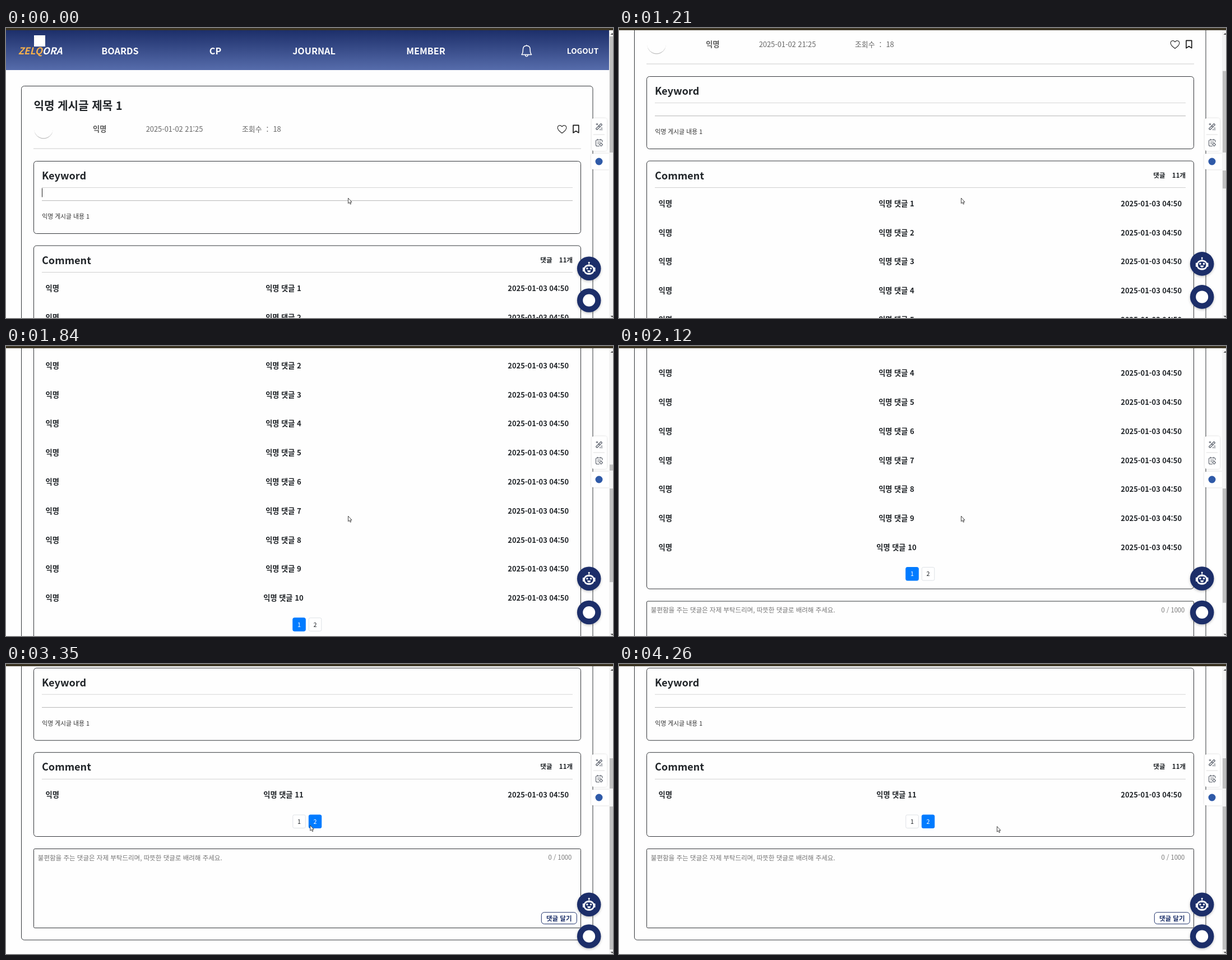
Recreate the animation shown at these times as an HTML page. Size 1083 by 517 pixels, loop 5.12 s.

```html
<!DOCTYPE html>
<html lang="ko">
<head>
<meta charset="utf-8">
<title>Comments</title>
<style>
html, body { margin: 0; width: 100%; height: 100%; overflow: hidden; background: #fefefe; }
svg { display: block; width: 1083px; height: 517px; }
text { font-family: "Noto Sans CJK KR", "Noto Sans CJK", "Noto Sans", sans-serif; white-space: pre; }
</style>
</head>
<body>
<svg id="stage" viewBox="0 0 1083 517" xmlns="http://www.w3.org/2000/svg">
  <defs>
    <linearGradient id="sky" x1="0" y1="0" x2="0" y2="1">
      <stop offset="0" stop-color="#1d2f6a"/><stop offset="1" stop-color="#566cab"/>
    </linearGradient>
    <filter id="soft" x="-30%" y="-30%" width="160%" height="160%">
      <feDropShadow dx="0" dy="1.5" stdDeviation="2" flood-color="#000" flood-opacity=".25"/>
    </filter>
    <filter id="faint" x="-30%" y="-30%" width="160%" height="160%">
      <feDropShadow dx="0" dy="0" stdDeviation="1.8" flood-color="#000" flood-opacity=".18"/>
    </filter>
  </defs>
  <g id="page"></g>
  <g id="bar"></g>
  <g id="tools"></g>
  <g id="robot"></g>
  <g id="chat"></g>
  <rect width="1083" height="4" fill="#3b3423"/>
  <path id="cursor" d="M0 0V9.6L2.2 7.6L3.7 11L5.2 10.3L3.7 7.1H6.5Z" fill="#fff" stroke="#333" stroke-width=".9" stroke-linejoin="round"/>
</svg>
<script>
const LOOP = 5120, SWITCH = 3350, ROW = 51.8, SHRINK = 9 * ROW, MAX_SCROLL = 696.5;
const INK = '#212529', BLUE = '#007bff', NAVY = '#1c2f69';
const $ = id => document.getElementById(id);

const text = (x, y, str, size, { bold = true, fill = INK, anchor = 'start', extra = '' } = {}) =>
  `<text x="${x}" y="${y}" font-size="${size}" font-weight="${bold ? 700 : 400}" fill="${fill}" text-anchor="${anchor}" ${extra}>${str}</text>`;
const rect = (x, y, w, h, r, attrs) =>
  `<rect x="${x}" y="${y}" width="${w}" height="${h}" rx="${r}" ${attrs}/>`;
const box = (y, h, id = '', r = 5) =>
  rect(49.5, y, 976, h, r, `id="${id}" fill="none" stroke="#33363a"`);
const rule = (x1, x2, y, color) => `<path d="M${x1} ${y}H${x2}" stroke="${color}"/>`;
const line = (d, color, width) =>
  `<path d="${d}" fill="none" stroke="${color}" stroke-width="${width}" stroke-linecap="round" stroke-linejoin="round"/>`;

function header() {
  const nav = [['BOARDS', 203.5], ['CP', 373.5], ['JOURNAL', 549.5], ['MEMBER', 749]];
  return rect(0, 4, 1076, 71, 0, 'fill="url(#sky)"') +
    rect(50, 13, 20, 20, 0, 'fill="#fff"') +
    text(61, 46.5, '<tspan fill="#f5b04c">ZELQ</tspan>ORA', 17, { fill: '#fff', anchor: 'middle', extra: 'font-style="italic"' }) +
    nav.map(([s, x]) => text(x, 46.5, s, 16.2, { fill: '#fff', anchor: 'middle' })).join('') +
    line('M920 47.5C922 45.5 922.4 43 922.4 38.5C922.4 34 925 31.6 928.8 31.6S935.2 34 935.2 38.5C935.2 43 935.6 45.5 937.6 47.5ZM926.4 48C926.8 51.5 930.8 51.5 931.2 48M928.8 30.4V31.6', '#fff', 1.5) +
    text(1029, 45.5, 'LOGOUT', 13.5, { fill: '#fff', anchor: 'middle' });
}

function post() {
  const grey = '#666';
  return rect(27.5, 103.5, 1019.5, 1085, 5, 'id="frame" fill="none" stroke="#33363a"') +
    text(49.5, 145.6, '익명 게시글 제목 1', 20.1) +
    '<circle cx="67" cy="180.8" r="16.6" fill="#bbb"/><circle cx="67" cy="179" r="17.2" fill="#fefefe"/>' +
    text(155, 185, '익명', 13.2, { fill: '#5c5c5c' }) +
    text(249.7, 184.8, '2025-01-02 21:25', 12.85, { bold: false, fill: grey }) +
    text(421, 184.8, '조회수 ： 18', 12.85, { bold: false, fill: grey }) +
    line('M992 187.5C986.5 183.6 984.2 181.3 984.2 178C984.2 173 990 172.2 992 176C994 172.2 999.8 173 999.8 178C999.8 181.3 997.5 183.6 992 187.5Z', '#222', 1.1) +
    line('M1012 173.4H1021.8V186.8L1016.9 183.6L1012 186.8Z', '#111', 1.6) +
    rule(49, 1026, 215, '#ccc') +
    box(237.5, 129) + text(64, 270, 'Keyword', 18.1) +
    rule(64, 1011, 284.5, '#d5d5d5') + rule(64, 1011, 307.7, '#b4b4b4') +
    '<path id="caret" d="M64.5 285.5V301.5" stroke="#222"/>' +
    text(64.3, 340, '익명 게시글 내용 1', 10.8, { bold: false, fill: '#333' });
}

function comment(n, row) {
  const y = 468.8 + row * ROW;
  return text(70.6, y, '익명', 13.3) +
    text(495, y, `익명 댓글 ${n}`, 13.2, { anchor: 'middle' }) +
    text(1004, y, '2025-01-03 04:50', 12.9, { anchor: 'end' });
}

function comments() {
  const first = Array.from({ length: 10 }, (_, i) => comment(i + 1, i)).join('');
  return box(388, 616, 'list') + text(64, 420.5, 'Comment', 18.1) +
    text(953.3, 417.6, '댓글', 11.5) + text(1011, 417.6, '11개', 11.5, { anchor: 'end' }) +
    rule(64, 1011, 435.5, '#d0d0d0') +
    `<g id="first">${first}</g><g id="second">${comment(11, 0)}</g>`;
}

function pager() {
  return [1, 2].map(n => rect(483.3 + 28.5 * n, 965.5, 22.5, 23.5, 2.5, `id="tab${n}"`) +
    text(494.5 + 28.5 * n, 981.4, n, 10.8, { bold: false, anchor: 'middle', extra: `id="num${n}"` })).join('');
}

function form() {
  const hint = { bold: false, fill: '#757575' };
  return box(1026, 141, '', 2) +
    text(56.8, 1046.2, '불편함을 주는 댓글은 자제 부탁드리며, 따뜻한 댓글로 배려해 주세요.', 11.53, hint) +
    text(1009.3, 1045.5, '0 / 1000', 11.2, { ...hint, anchor: 'end' }) +
    rect(955.3, 1139.3, 63, 20.6, 5, `fill="#fff" stroke="${NAVY}"`) +
    text(986.7, 1154, '댓글 달기', 11.5, { fill: NAVY, anchor: 'middle' });
}

$('page').innerHTML = header() + post() + comments() + `<g id="tail">${pager()}${form()}</g>`;

$('bar').innerHTML = rect(1076, 4, 7, 513, 0, 'fill="#f3f3f3"') +
  rect(1077, 15, 6, 210, 0, 'id="thumb" fill="#bfbfbf"') +
  '<path d="M1078.5 12L1081.5 9L1084.5 12ZM1078.5 513L1081.5 516L1084.5 513Z" fill="#555"/>';

$('tools').innerHTML =
  rect(1045, 161, 27, 58, 4, 'fill="#fff" filter="url(#faint)"') +
  '<path d="M1080 224H1048Q1044 224 1044 228V248Q1044 252 1048 252H1076V224Z" fill="#fff" filter="url(#faint)"/>' +
  rect(1076, 222, 7, 32, 0, 'fill="#f3f3f3"') +
  rule(1048, 1068, 190, '#ddd') +
  line('M1052.5 179.5L1061.5 170.5L1063.5 172.5L1054.5 181.5ZM1059 181.3H1064M1061.5 178.5H1064M1053 171.5H1056M1054.5 170V173M1057 174L1059.5 176.5', '#555b66', 1.1) +
  line('M1064 203V201.5Q1064 199.5 1062 199.5H1054.5Q1052.5 199.5 1052.5 201.5V208.5Q1052.5 210.5 1054.5 210.5H1058.5M1055.5 198V200M1061 198V200M1055.5 203.3H1061M1055.5 206.3H1058.5M1061.7 205L1064.5 207.8L1061.7 210.6L1059 207.8Z', '#555b66', 1.1) +
  '<circle cx="1058" cy="238" r="6.5" fill="#2f5aa8"/>';

const disc = `<circle r="21.3" fill="${NAVY}" filter="url(#soft)"/>`;
$('robot').innerHTML = disc +
  '<circle cy="-10.5" r="1.5" fill="#fff"/><path d="M0 -10V-6" stroke="#fff" stroke-width="1.2"/>' +
  rect(-11.3, -2, 3, 7.5, 1.4, 'fill="#fff"') + rect(8.3, -2, 3, 7.5, 1.4, 'fill="#fff"') +
  '<path d="M-9.3 2C-9.3 -4.5 -5.5 -7 0 -7S9.3 -4.5 9.3 2S5.5 11 0 11S-9.3 8.5 -9.3 2Z" fill="#fff"/>' +
  rect(-7.2, -3.8, 14.4, 11.6, 5.2, `fill="${NAVY}"`) +
  '<circle cx="-3.3" cy="0" r="1.8" fill="#fff"/><circle cx="3.3" cy="0" r="1.8" fill="#fff"/>' +
  '<path d="M-3.2 3.2H3.2Q2.6 6.4 0 6.4T-3.2 3.2Z" fill="#fff"/>';
$('chat').innerHTML = disc + '<circle r="11" fill="#fff"/>';

// Each track is a list of [time, value, ...] joined by straight runs.
const scrollTrack = [[980, 0], [990, 9.8], [1060, 46], [1130, 98], [1410, 310], [1480, 352.5],
  [1760, 455], [2120, 571], [2330, 668], [2470, MAX_SCROLL]];
const robotTrack = [[980, 0], [990, -.5], [1270, -11], [1480, -13.7], [2120, -14.3], [2470, -12],
  [2680, -3.3], [2890, 0], [3350, 0], [3490, -5], [3630, -9.7], [3840, -9], [4060, -3], [4200, 0]];
const chatTrack = [[980, 0], [990, -.4], [1270, -8], [1480, -10.5], [2120, -10.5], [2470, -6],
  [2680, -.5], [2820, 0], [3350, 0], [3490, -6], [3630, -9.7], [3840, -6], [4060, -1], [4200, 0]];
const cursorTrack = [[2400, 610.5, 303.2], [2680, 561, 293.6], [2890, 542.8, 287.6], [3350, 542.8, 287.6],
  [3630, 687.5, 294.6], [3840, 674.5, 289.6]];

function at(track, t, k = 1) {
  const i = track.findIndex(p => p[0] > t);
  if (i === 0) return track[0][k];
  if (i < 0) return track[track.length - 1][k];
  const a = track[i - 1], b = track[i];
  return a[k] + (b[k] - a[k]) * (t - a[0]) / (b[0] - a[0]);
}

function snap(t) {
  const start = [0, 990, 1560, 2120, 2680, 3350, 3920].filter(s => s <= t).pop();
  return start + Math.floor((t - start) / 70) * 70;
}

const move = (id, x, y) => $(id).setAttribute('transform', `translate(${x} ${y})`);
const show = (id, on) => $(id).setAttribute('visibility', on ? 'visible' : 'hidden');

function draw(time) {
  const t = snap(time), second = t >= SWITCH;
  const cut = second ? SHRINK : 0;
  const scroll = second ? MAX_SCROLL - SHRINK : at(scrollTrack, t);
  move('page', 0, -scroll);
  move('tail', 0, -cut);
  $('frame').setAttribute('height', 1085 - cut);
  $('list').setAttribute('height', 616 - cut);
  show('caret', t < 70);
  show('first', !second);
  show('second', second);
  for (const n of [1, 2]) {
    const active = (n === 2) === second;
    $('tab' + n).setAttribute('fill', active ? BLUE : '#fff');
    $('tab' + n).setAttribute('stroke', active ? BLUE : '#dee2e6');
    $('num' + n).setAttribute('fill', active ? '#fff' : INK);
  }
  const ratio = 494 / (513 + MAX_SCROLL - cut);
  $('thumb').setAttribute('y', 15 + scroll * ratio);
  $('thumb').setAttribute('height', 513 * ratio);
  move('robot', 1040.2, 428.8 + at(robotTrack, t));
  move('chat', 1040.2, 485.5 + at(chatTrack, t));
  move('cursor', at(cursorTrack, t), at(cursorTrack, t, 2));
}

const begin = performance.now();
function tick() {
  draw((performance.now() - begin) % LOOP);
  requestAnimationFrame(tick);
}
tick();
</script>
</body>
</html>
```
